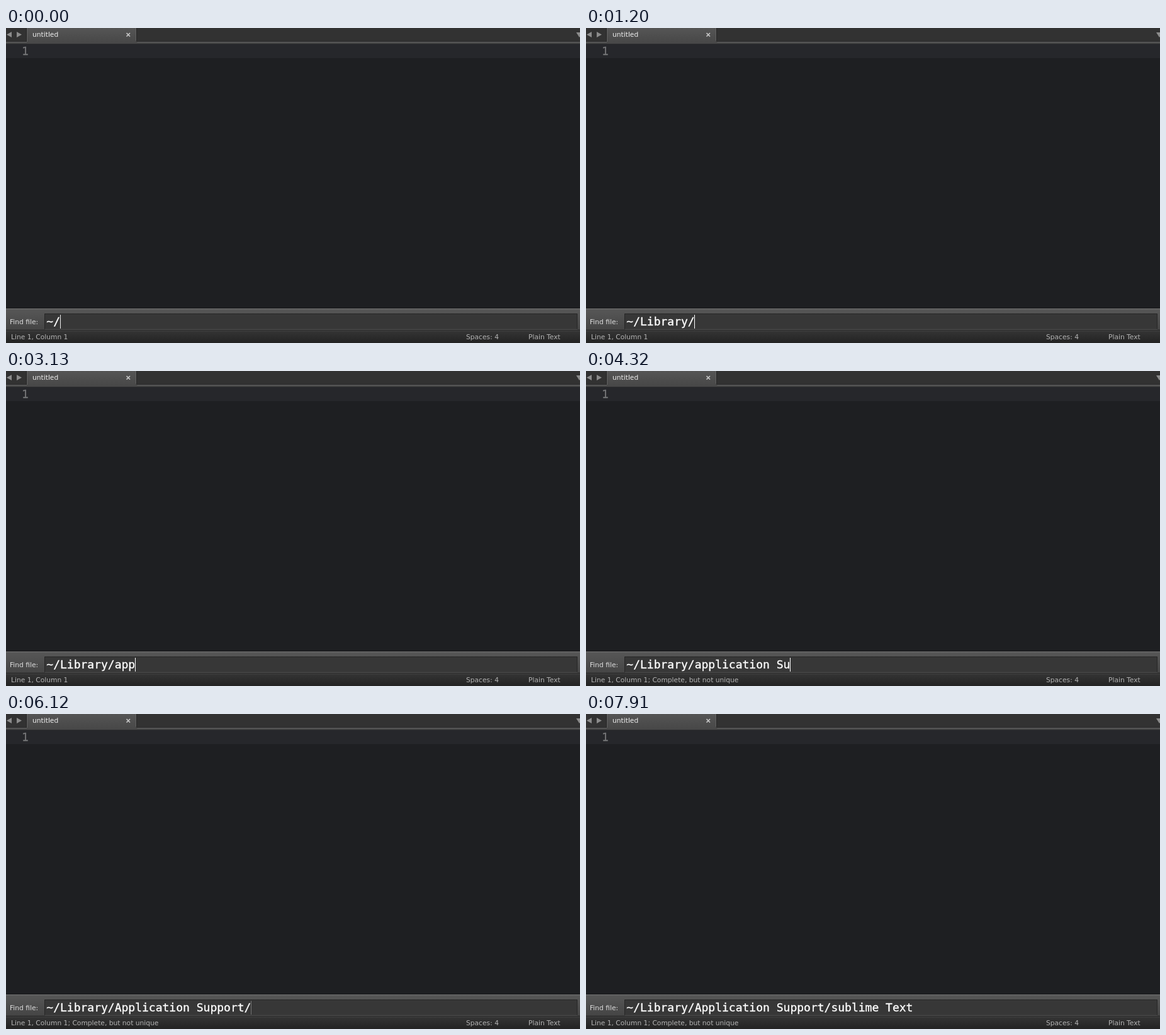
Recreate the animation shown at these times as an HTML page. Size 912 by 502 pixels, loop 8 s.

```html
<!DOCTYPE html>
<html lang="en">
<head>
<meta charset="utf-8">
<title>Find file prompt</title>
<style>
  html, body { margin: 0; width: 100%; height: 100%; overflow: hidden; background: #1e1f22; }
  svg { display: block; width: 100vw; height: 100vh; }
  text { white-space: pre; }
  .ui { font: 10.7px "DejaVu Sans", sans-serif; fill: #b4b4b4; }
  .mono { font: 18px "DejaVu Sans Mono", monospace; }
  #path { fill: #fff; stroke: #fff; stroke-width: .35px; }
</style>
</head>
<body>
<svg viewBox="0 0 912 502" preserveAspectRatio="none">
  <defs>
    <linearGradient id="tab" x2="0" y2="1">
      <stop offset="0" stop-color="#555"/><stop offset="1" stop-color="#484848"/>
    </linearGradient>
    <linearGradient id="panel" x2="0" y2="1">
      <stop offset="0" stop-color="#575757"/><stop offset="1" stop-color="#444"/>
    </linearGradient>
    <linearGradient id="status" x2="0" y2="1">
      <stop offset="0" stop-color="#343434"/><stop offset="1" stop-color="#232323"/>
    </linearGradient>
  </defs>

  <!-- editor -->
  <rect width="912" height="502" fill="#1e1f22"/>
  <rect y="26" width="912" height="22" fill="#26272b"/>
  <text class="mono" x="25" y="43" fill="#77787a" stroke="#77787a" stroke-width=".3">1</text>

  <!-- tab bar -->
  <rect width="912" height="22" fill="#323232"/>
  <rect y="21" width="912" height="1" fill="#292929"/>
  <rect y="22" width="912" height="1" fill="#626262"/>
  <rect y="23" width="912" height="2" fill="#484848"/>
  <rect y="25" width="912" height="1" fill="#2c2d2f"/>
  <path d="M32.5 22V0M207.5 0V22" stroke="#222"/>
  <path d="M33 23V0H207V20Q207 22 209 23Z" fill="url(#tab)"/>
  <path d="M33.5 22V0M206.5 0V20" stroke="#626262"/>
  <path d="M9 6V15L1 10.5ZM17 6V15L25 10.5ZM906 7H916L911 15Z" fill="#8c8c8c"/>
  <text class="ui" x="42" y="14" style="fill:#f0f0f0">untitled</text>
  <path d="M191.5 8L197 13.5M197 8L191.5 13.5" stroke="#c8c8c8" stroke-width="1.7"/>

  <!-- input panel -->
  <rect y="446" width="912" height="1" fill="#18191b"/>
  <rect y="447" width="912" height="1" fill="#767676"/>
  <rect y="448" width="912" height="34" fill="url(#panel)"/>
  <rect x="61" y="455" width="847" height="25" fill="#373737"/>
  <path d="M61.5 480V455.5H907.5V480" fill="none" stroke="#262626"/>
  <path d="M62 480.5H908" stroke="#555"/>
  <text class="ui" x="6" y="472" style="fill:#dedede">Find file:</text>
  <text class="mono" id="path" x="64.3" y="474"></text>
  <rect id="caret" y="457" width="1" height="22" fill="#fff"/>

  <!-- status bar -->
  <rect y="481" width="912" height="1" fill="#1f1f1f"/>
  <rect y="482" width="912" height="1" fill="#454545"/>
  <rect y="483" width="912" height="19" fill="url(#status)"/>
  <text class="ui" id="info" x="8" y="496"></text>
  <text class="ui" x="731" y="496">Spaces: 4</text>
  <text class="ui" x="830" y="496">Plain Text</text>
</svg>
<script>
  const LOOP = 8000;
  const $ = id => document.getElementById(id);
  const lib = "~/Library/", app = lib + "Application Support/";

  // [start ms, text in the prompt]
  const edits = [
    [0, "~/"], [450, "~/l"], [750, "~/li"], [1050, "~/lib"], [1200, lib],
    [2690, lib + "a"], [2990, lib + "ap"], [3130, lib + "app"],
    [3580, lib + "application S"], [4320, lib + "application Su"],
    [5070, app], [6420, app + "s"], [6570, app + "su"],
    [6860, app + "sub"], [7010, app + "subl"], [7460, app + "sublime Text "]
  ];

  // [start ms, caret opacity]
  const blinks = [
    [0, .9], [150, .35], [300, 0], [450, 1],
    [1650, .35], [1800, 0], [2250, .35], [2400, .85], [2540, 1],
    [4020, .35], [4170, 0], [4320, 1],
    [4620, .35], [4770, 0], [5070, 1],
    [5520, .35], [5670, 0], [6120, .3], [6270, .85], [6420, 1],
    [7760, .35], [7910, 0]
  ];

  const at = (steps, t) => steps.filter(s => s[0] <= t).pop()[1];

  function draw(t) {
    const text = at(edits, t);
    $("path").textContent = text;
    $("caret").setAttribute("x", Math.floor(64.72 + 10.825 * text.length));
    $("caret").setAttribute("opacity", at(blinks, t));
    $("info").textContent = "Line 1, Column 1" + (t >= 3580 ? "; Complete, but not unique" : "");
  }

  let start;
  function tick(now) {
    start ??= now;
    draw(Math.max(0, now - start) % LOOP);
    requestAnimationFrame(tick);
  }
  draw(0);
  requestAnimationFrame(tick);
</script>
</body>
</html>
```
